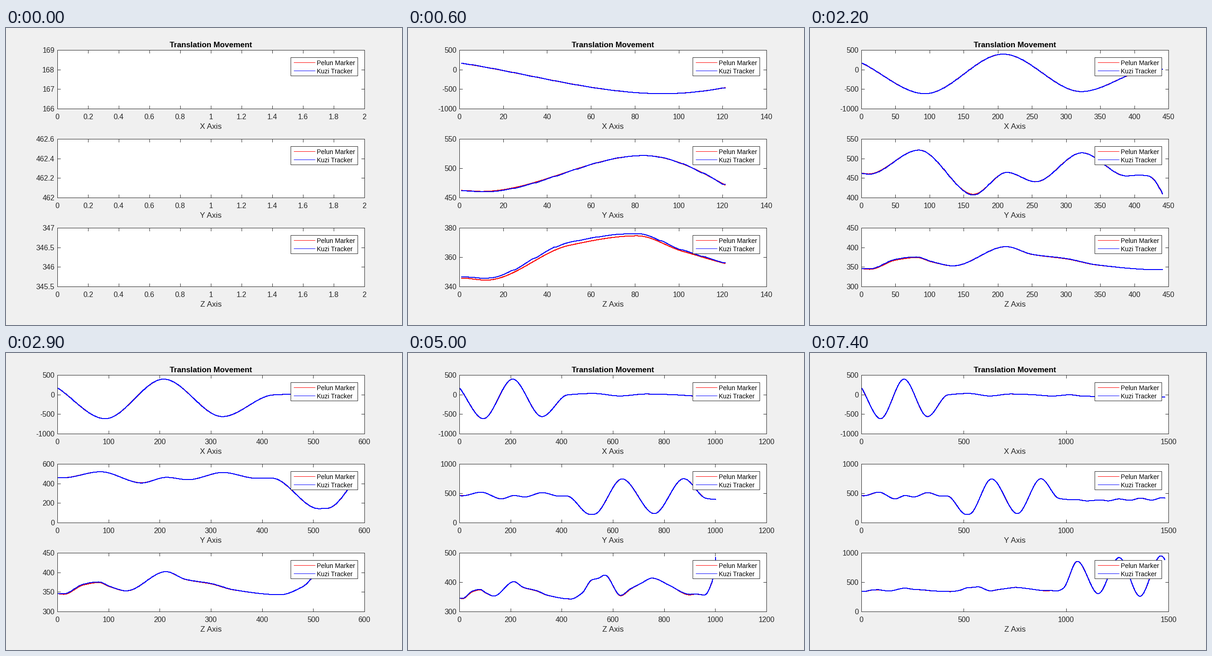
Write a matplotlib script that moves like this. It is 864 by 648 pixels and loops after 7500 ms.

```python
import numpy as np
import matplotlib.pyplot as plt
from matplotlib.animation import FuncAnimation
from matplotlib.patches import Rectangle
from matplotlib.transforms import Affine2D

W, H, DPI = 864, 648, 72
FRAMES, INTERVAL, STEP = 75, 100, 20
LEFT, RIGHT, TOP, HEIGHT, SPACING = 112, 782, 48, 128, 194
INK = (0.15, 0.15, 0.15)
SERIES = (("Pelun Marker", "red"), ("Kuzi Tracker", "blue"))

plt.rcParams["font.family"] = "Liberation Sans"
plt.rcParams["axes.unicode_minus"] = False


def swing(start, half, *values):
    """Evenly spaced turning points."""
    return [(start + half * i, v) for i, v in enumerate(values)]


def smooth(knots, t):
    """Monotone cubic through the knots, level at every turning point."""
    x, y = np.array(knots, float).T
    d = np.diff(y) / np.diff(x)
    m = np.zeros_like(y)
    for i in range(1, len(x) - 1):
        if d[i - 1] * d[i] > 0:
            m[i] = 2 * d[i - 1] * d[i] / (d[i - 1] + d[i])
    i = np.clip(np.searchsorted(x, t, side="right") - 1, 0, len(x) - 2)
    h = x[i + 1] - x[i]
    s = (t - x[i]) / h
    ease = s * s * (3 - 2 * s)
    return (y[i] + (y[i + 1] - y[i]) * ease
            + h * s * (1 - s) * (m[i] * (1 - s) - m[i + 1] * s))


def tracker_clock(t):
    """The tracker runs slightly fast and repeats a sample every 9.6."""
    p = (t - 24) % 9.6
    return t + np.where(p < 1, 0.5 - p, (p - 1) / 8.6 - 0.5)


def make_pair(knots, bumps):
    """Marker curve, and the tracker curve with bell-shaped errors."""
    error = sum(a * np.exp(-((samples - c) / w) ** 2) for c, a, w in bumps)
    return smooth(knots, samples), smooth(knots, tracker_clock(samples)) + error


samples = np.arange(1, (FRAMES - 1) * STEP + 2)

# One axis at a time is swept back and forth while the others drift.
x_knots = [(-30, 313), *swing(93, 114.5, -611, 400, -557),
           *swing(422, 102, -3, 34, -30, 20, 4, -32),
           (1018, 0), (1080, -35), (1490, -62)]

y_knots = [(1, 462.52), (10, 460.9), (84, 522), (164, 409), (213, 465),
           (255, 441), (323, 515), (388, 456), (406, 458), (420, 456),
           (510, 145), (526, 147), (635, 748), (761, 157), (876, 752),
           (965, 415), (1015, 397), (1045, 398), (1100, 374), (1168, 390),
           *swing(1204, 53, 374, 407, 383, 421, 387, 428, 388)]

z_knots = [(1, 345.9), (12, 344.5), (50, 368.2), (81, 374.7), (102, 364),
           (134, 353.3), (212, 402.5), (250, 382.5), (301, 371), (345, 355.5),
           (435, 343.5), (479, 364), (516, 408), (543, 414.3), (568, 425),
           (630, 354.5), (668, 377), (712, 398), (752, 414.5), (820, 390),
           (899, 357.5), (922, 360), (957, 357), (985, 398),
           *swing(1054, 102, 859, 309, 924, 264, 952, 264)]


def nice_ticks(lo, hi, most):
    """Tightest round limits with at most `most` intervals."""
    best = None
    base = int(np.floor(np.log10(hi - lo))) - 1
    for power in range(base, base + 4):
        for mult in (1, 2, 5):
            step = mult * 10.0 ** power
            a = int(np.floor(lo / step + 1e-9))
            b = int(np.ceil(hi / step - 1e-9))
            span = (b - a) * step
            if b - a <= most and (best is None or span < best[0] - 1e-9):
                best = span, step, a, b
    _, step, a, b = best
    return np.arange(a, b + 1) * step


fig = plt.figure(figsize=(W / DPI, H / DPI), dpi=DPI, facecolor=(0.94,) * 3)

# Pixel-space layer for title, axis names and legends.
over = fig.add_axes([0, 0, 1, 1], zorder=5)
over.set(xlim=(0, W), ylim=(H, 0))
over.axis("off")


def draw_legend(top):
    over.add_patch(Rectangle((621, top + 16), 146, 40, facecolor="white",
                             edgecolor=INK, linewidth=1))
    for row, (name, color) in enumerate(SERIES):
        y = top + 27 + 18 * row
        over.plot([628, 674], [y, y], color=color, lw=1)
        over.text(677.5, y + 6, name, size=14, color="black")


def make_panel(row, name, data):
    top = TOP + SPACING * row
    bottom = top + HEIGHT
    ax = fig.add_axes([LEFT / W, 1 - bottom / H, (RIGHT - LEFT) / W, HEIGHT / H])
    for spine in ax.spines.values():
        spine.set(color=INK, linewidth=1)
    ax.tick_params(direction="in", top=True, right=True, length=7, width=1,
                   color=INK, labelcolor=INK, labelsize=16)
    ax.tick_params(axis="x", pad=23)
    ax.tick_params(axis="y", pad=6)
    # Half a pixel puts the curves on the same centres as the snapped frame.
    centred = ax.transData + Affine2D().translate(0.5, -0.5)
    lines = [ax.plot([], [], color=color, lw=1, antialiased=False,
                     transform=centred)[0] for _, color in SERIES]
    over.text((LEFT + RIGHT) / 2, bottom + 44, name, size=17,
              color=INK, ha="center")
    draw_legend(top)
    return ax, lines, data


over.text((LEFT + RIGHT) / 2 - 0.5, 42.5, "Translation Movement", size=17,
          weight="bold", color="black", ha="center")
panels = [
    make_panel(0, "X Axis", make_pair(x_knots, [(1, 2.2, 20)])),
    make_panel(1, "Y Axis", make_pair(y_knots, [(25, -1, 25), (162, -2, 15)])),
    make_panel(2, "Z Axis", make_pair(z_knots, [(50, 2, 55), (300, 0.8, 50),
                                                (650, 2, 30), (890, 2, 30)])),
]


def update(frame):
    n = 1 + STEP * frame
    xt = nice_ticks(0, max(n, 2), 10)
    for ax, lines, data in panels:
        shown = [d[:n] for d in data]
        yt = nice_ticks(np.min(shown), np.max(shown), 3)
        ax.set_xticks(xt, [f"{v:g}" for v in xt])
        ax.set_yticks(yt, [f"{v:g}" for v in yt])
        ax.set(xlim=(xt[0], xt[-1]), ylim=(yt[0], yt[-1]))
        for label in ax.get_xticklabels():
            label.set_va("baseline")
        for line, values in zip(lines, shown):
            line.set_data(samples[:n], values)
    return []


anim = FuncAnimation(fig, update, frames=FRAMES, interval=INTERVAL,
                     init_func=lambda: [], repeat=True, repeat_delay=0)
plt.show()
```
